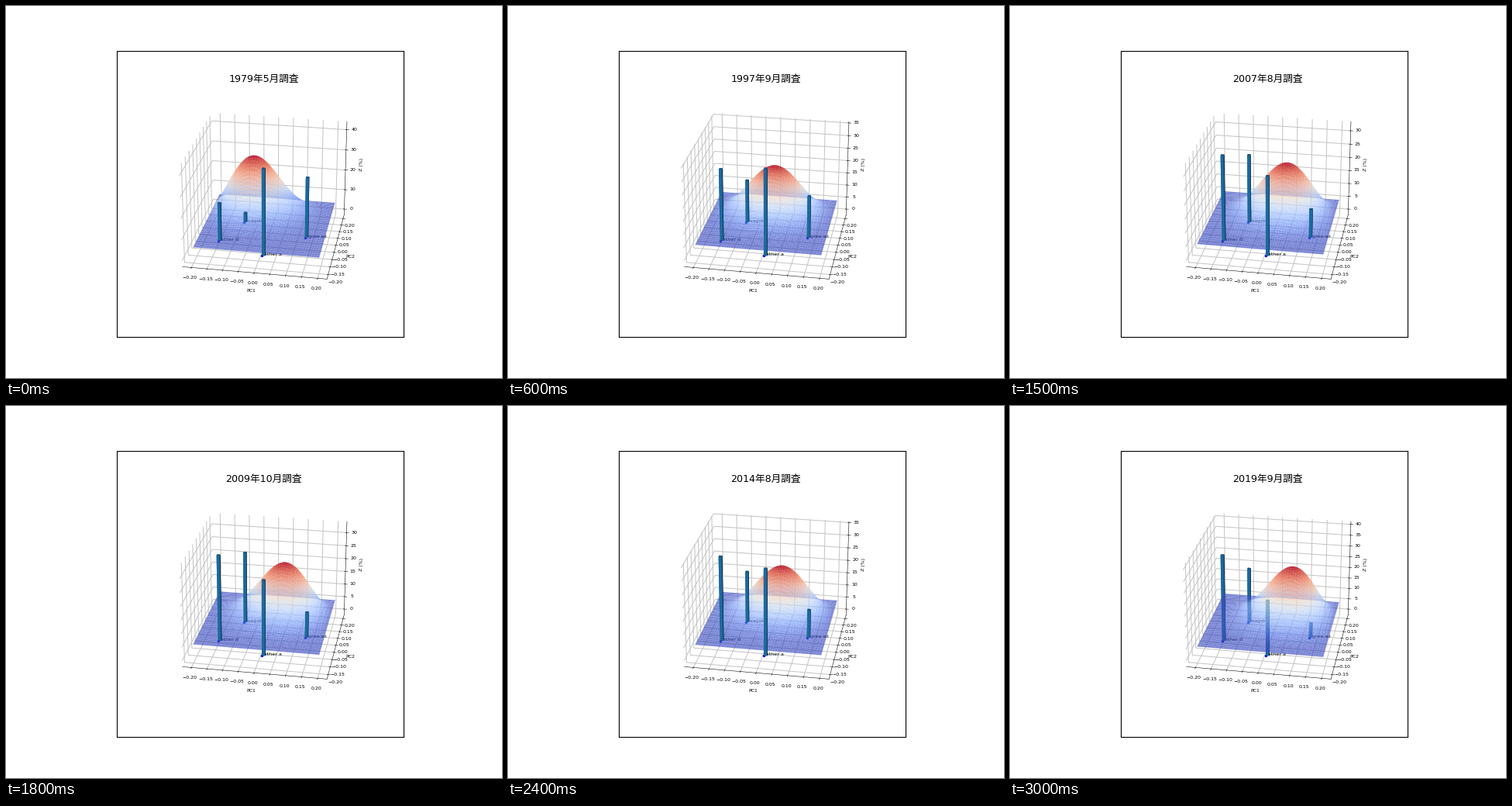
Write a matplotlib script that moves like this. It is 640 px wide and 480 px high and loops after 3300 ms.

```python
import numpy as np
import matplotlib.pyplot as plt
from matplotlib.animation import FuncAnimation
from matplotlib.ticker import MultipleLocator

plt.rcParams.update({
    "font.family": ["DejaVu Sans", "Noto Sans CJK JP"],
    "grid.color": "#c4c4c4",
    "grid.linewidth": 1.5,
})

W, H, DPI = 640, 480, 48

# survey dates as year.month
DATES = ("1979.5 1992.11 1997.9 2002.7 2004.11 2007.8 "
         "2009.10 2012.10 2014.8 2016.9 2019.9").split()
SURVEYS = [tuple(map(int, d.split("."))) for d in DATES]
TIMES = np.array([year + month / 12 for year, month in SURVEYS])

# turning points of the trend; shares run linearly between them
TURNS = TIMES[[0, 1, 3, 6, 7, 10]]

# label, anchor on the PC1/PC2 plane, share in % at each turning point
ANSWERS = [
    ("agree wi", 0.127, -0.004, (29.1, 19.8, 12.8, 9.5, 12.4, 6.5)),
    ("rather a", 0.011, -0.153, (41.0, 35.8, 30.5, 27.8, 36.0, 24.6)),
    ("rather d", -0.147, -0.075, (18.3, 26.4, 29.4, 31.9, 30.4, 38.5)),
    ("disagree", -0.091, 0.072, (4.5, 11.9, 21.7, 26.7, 18.4, 24.9)),
]
NAMES, PX, PY, TREND = zip(*ANSWERS)
FLOOR = np.zeros(len(ANSWERS))

BASE = 4.8
GX, GY = np.meshgrid(np.linspace(-0.2, 0.2, 50), np.linspace(-0.2, 0.2, 50))
DOME = (1 - (GX / 0.2) ** 2) * (1 - (GY / 0.2) ** 2)


def hill(shares):
    """Bump that drifts along PC1 as disagreement grows, flat at the edges."""
    against = shares[2] + shares[3]
    peak = 12.8 + 0.33 * max(shares) + 0.011 * (against - 46) ** 2
    cx = 0.005 * (against - 42)
    cy = 0.1 - 0.35 * cx
    bump = DOME * np.exp(-((GX - cx) / 0.11) ** 2 / 2
                         - ((GY - cy) / 0.09) ** 2 / 2)
    return BASE + (peak - BASE) * bump / bump.max()


fig = plt.figure(figsize=(W / DPI, H / DPI), dpi=DPI, facecolor="white")

# square frame, and the 3D axes placed inside it
SIDE = 0.77 * H
LEFT, BOTTOM = 328 - SIDE / 2, 0.11 * H
frame = fig.add_axes([LEFT / W, BOTTOM / H, SIDE / W, SIDE / H])
frame.set(xticks=[], yticks=[])
for spine in frame.spines.values():
    spine.set_linewidth(1.65)

ax = fig.add_axes(
    [(LEFT + 0.125 * SIDE) / W, (BOTTOM + 0.11 * SIDE) / H,
     0.775 * SIDE / W, 0.77 * SIDE / H], projection="3d")
ax.view_init(elev=25, azim=-80)

title = fig.text((LEFT + 0.5125 * SIDE) / W, 1 - 98 / H, "",
                 fontsize=19, ha="center", va="baseline")


def style_axes(top):
    ax.patch.set_visible(False)
    ax.margins(0.05)
    label = dict(fontsize=9.4, labelpad=3)
    ax.set_xlabel("PC1", **label)
    ax.set_ylabel("PC2", **label)
    ax.set_zlabel("Z (%)", **label)
    steps = (0.05, 0.05, 10 if top > 40 else 5)
    for axis, step in zip((ax.xaxis, ax.yaxis, ax.zaxis), steps):
        axis.set_major_locator(MultipleLocator(step))
        axis.set_pane_color((1, 1, 1, 1))
        axis.set_tick_params(labelsize=9.3, pad=3)


def draw(i):
    year, month = SURVEYS[i]
    shares = np.array([np.interp(TIMES[i], TURNS, t) for t in TREND])
    title.set_text(f"{year}年{month}月調査")
    ax.clear()
    style_axes(shares.max())
    for name, x, y in zip(NAMES, PX, PY):
        ax.text(x, y, 0, name, fontsize=9.6)
    ax.scatter(PX, PY, FLOOR, s=18, color="b", depthshade=False)
    ax.plot_surface(GX, GY, hill(shares), cmap="coolwarm", alpha=0.7,
                    linewidth=0, antialiased=True)
    ax.bar3d(PX, PY, FLOOR, 0.01, 0.01, shares, color="#1f77b4")
    return []


anim = FuncAnimation(fig, draw, frames=len(SURVEYS), interval=300,
                     repeat=True, repeat_delay=0, blit=False)
plt.show()
```
